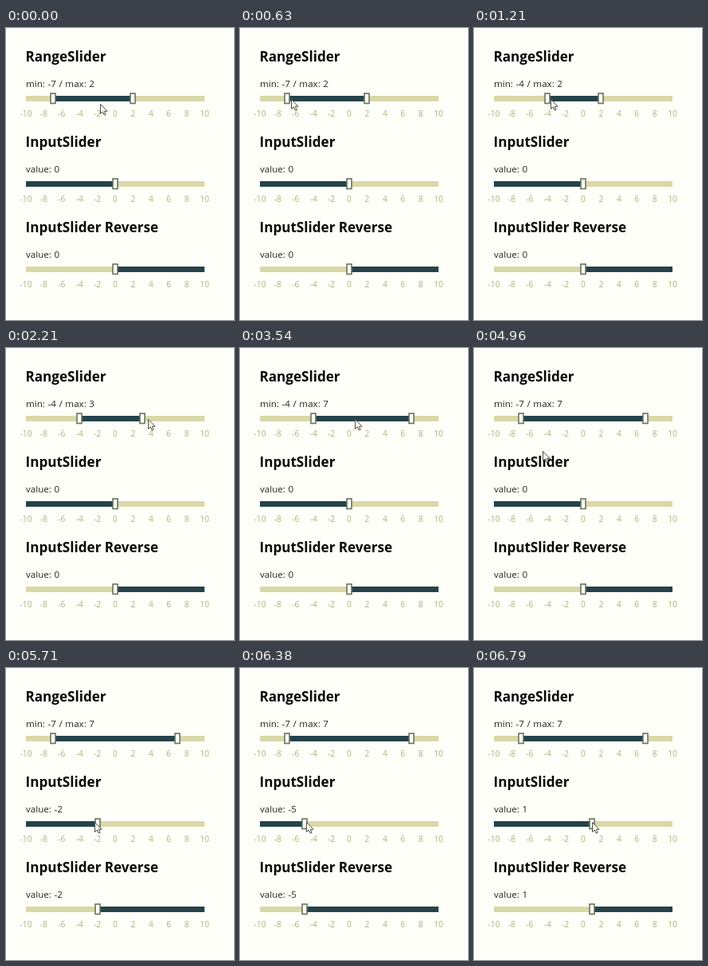
These frames come from a looping animation (286 px wide and 366 px high, 6830 ms). An HTML page:

```html
<!DOCTYPE html>
<html lang="en">
<head>
<meta charset="utf-8">
<title>Sliders</title>
<style>
  html, body { margin: 0; width: 100%; height: 100%; overflow: hidden; background: #fffff9; }
  svg { display: block; }
  text { font-family: "Open Sans", "Noto Sans", sans-serif; }
  .title { font-size: 17.1px; font-weight: 700; fill: #080808; }
  .value { font-size: 11.6px; word-spacing: 0.6px; fill: #20241c; }
  .tick { font-size: 10.2px; fill: #a9b47c; text-anchor: middle; }
  .track { fill: #d9d8a8; }
  .fill { fill: #27434a; }
  .thumb { fill: #fffffa; stroke: #66755a; stroke-width: 1.6; }
  .cursor { fill: #fffff9; stroke: #4c4c40; stroke-linejoin: round; }
</style>
</head>
<body>
<svg id="stage" width="286" height="366" viewBox="0 0 286 366"></svg>
<script>
  const LOOP = 6830;
  const LEFT = 25, STEP = 11.2;      // track start and pixels per unit
  const RANGE_Y = 89, INPUT_Y = 193; // cursor height over each track
  const stage = document.getElementById('stage');

  function add(parent, tag, attrs, content) {
    const el = document.createElementNS('http://www.w3.org/2000/svg', tag);
    for (const name in attrs) el.setAttribute(name, attrs[name]);
    if (content !== undefined) el.textContent = content;
    return parent.appendChild(el);
  }

  const toX = v => LEFT + (v + 10) * STEP;

  function makeSlider(title, row, thumbCount) {
    const g = add(stage, 'g', { transform: `translate(0 ${row * 107})` });
    add(g, 'text', { class: 'title', x: 24.5, y: 42 }, title);
    const label = add(g, 'text', { class: 'value', x: LEFT, y: 74 });
    const bar = { y: 85, height: 7 };
    add(g, 'rect', { class: 'track', x: LEFT, width: 20 * STEP, ...bar });
    const fill = add(g, 'rect', { class: 'fill', ...bar });
    for (let v = -10; v <= 10; v += 2) {
      add(g, 'text', { class: 'tick', x: toX(v), y: 111 }, v);
    }
    const thumbs = Array.from({ length: thumbCount }, () =>
      add(g, 'rect', { class: 'thumb', y: 82, width: 6, height: 12.5 }));

    return (caption, from, to, values) => {
      label.textContent = caption;
      fill.setAttribute('x', toX(from));
      fill.setAttribute('width', toX(to) - toX(from));
      thumbs.forEach((thumb, i) => thumb.setAttribute('x', Math.round(toX(values[i])) - 3));
    };
  }

  const setRange = makeSlider('RangeSlider', 0, 2);
  const setInput = makeSlider('InputSlider', 1, 1);
  const setReverse = makeSlider('InputSlider Reverse', 2, 1);
  const cursor = add(stage, 'path', {
    class: 'cursor',
    d: 'M0 0V12L2.8 9.5L4.7 13.6L6.6 12.8L4.8 8.8H8.5Z'
  });

  const ease = p => p * p * (3 - 2 * p);
  const clamp = p => Math.min(1, Math.max(0, p));

  // Replays the cursor's moves up to time t; a dragged thumb follows in whole units.
  function poseAt(t) {
    const pose = { x: 118, y: 95, min: -7, max: 2, value: 0 };

    function move(start, end, x, y, thumb) {
      const p = ease(clamp((t - start) / (end - start)));
      const dx = (x - pose.x) * p;
      pose.x += dx;
      pose.y += (y - pose.y) * p;
      if (thumb) pose[thumb] += Math.round(dx / STEP);
    }

    move(40, 710, 62, RANGE_Y);
    move(800, 1210, 96, RANGE_Y, 'min');
    move(1430, 1630, 165, RANGE_Y);
    move(2060, 2540, 221, RANGE_Y, 'max');
    move(2880, 3540, 144, RANGE_Y);
    move(3590, 4130, 89, RANGE_Y);
    move(4180, 4700, 55, RANGE_Y, 'min');
    move(4750, 5250, 136, INPUT_Y);
    move(5300, 5670, 111, INPUT_Y, 'value');
    move(5710, 6000, 81, INPUT_Y, 'value');
    move(6340, 6790, 148, INPUT_Y, 'value');
    return pose;
  }

  function draw(t) {
    const { x, y, min, max, value } = poseAt(t);
    setRange(`min: ${min} / max: ${max}`, min, max, [min, max]);
    setInput(`value: ${value}`, -10, value, [value]);
    setReverse(`value: ${value}`, value, 10, [value]);
    cursor.setAttribute('transform', `translate(${Math.round(x) + 0.5} ${Math.round(y) + 0.5})`);
  }

  const start = performance.now();
  function frame() {
    draw((performance.now() - start) % LOOP);
    requestAnimationFrame(frame);
  }
  frame();
</script>
</body>
</html>
```
